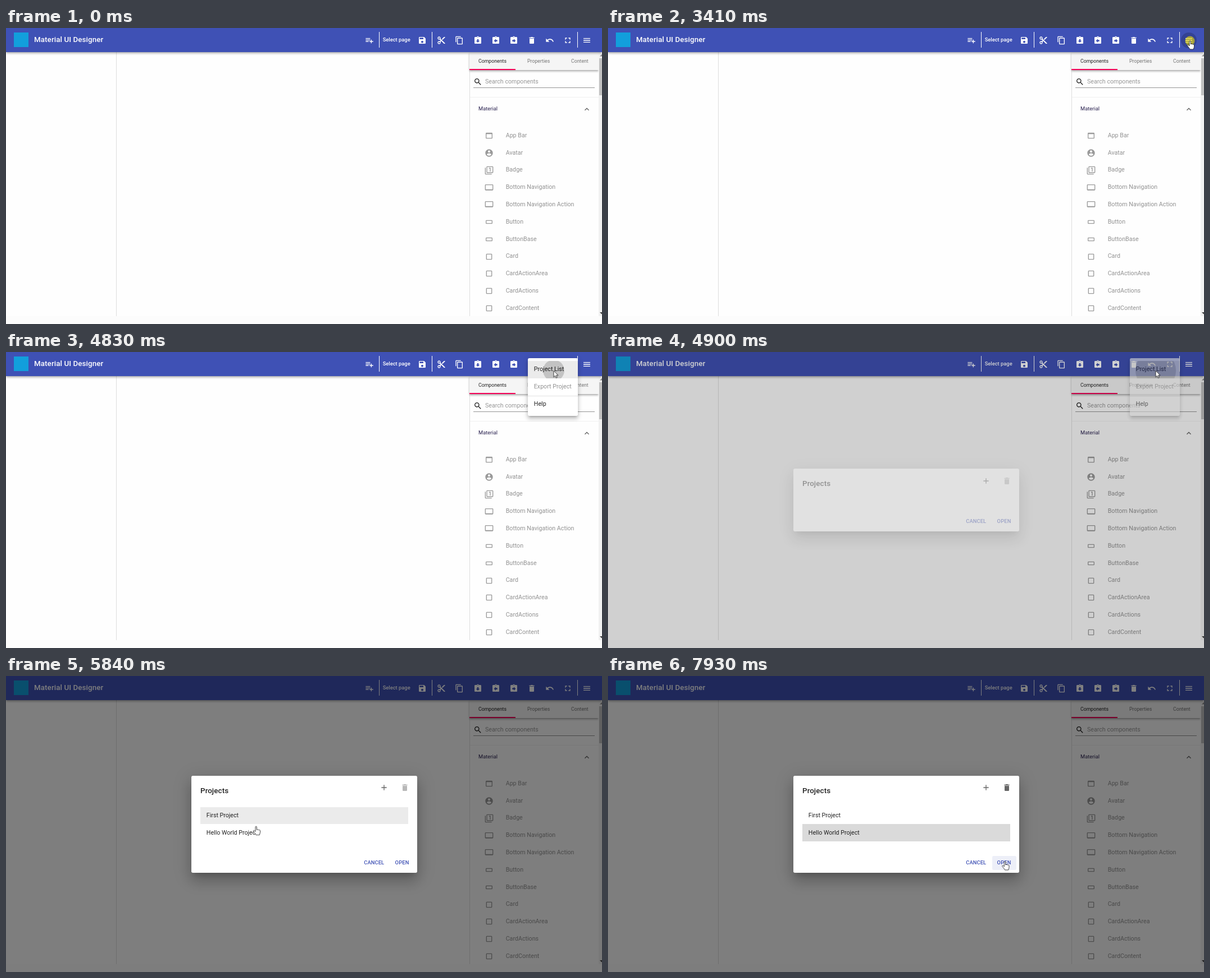
Recreate the animation shown at these times as an HTML page. Size 1061 by 528 pixels, loop 8 s.

```html
<!DOCTYPE html>
<html lang="en">
<head>
<meta charset="utf-8">
<title>Material UI Designer</title>
<style>
html, body { margin: 0; width: 100%; height: 100%; overflow: hidden; background: #fefefe; }
body { position: relative; font: 10.67px/16px Roboto, Arial, sans-serif; color: rgba(0,0,0,.87); }
div, span, svg { position: absolute; }
span { white-space: pre; }
svg { overflow: visible; }
.icon { width: 16px; height: 16px; fill: currentColor; fill-rule: evenodd; }
.fill { inset: 0; }
.title { font-size: 13.33px; font-weight: 500; letter-spacing: .1px; }
.small { font-size: 9.33px; }
.tab { font-size: 8.75px; }
.btn { font-size: 9.33px; font-weight: 500; letter-spacing: .12px; color: #3f51b5; }

#bar { left: 0; top: 0; width: 1061px; height: 43px; background: #3f51b5; color: #fff;
  box-shadow: 0 1.3px 2.7px -.7px rgba(0,0,0,.2), 0 2.7px 3.3px rgba(0,0,0,.14), 0 .7px 6.7px rgba(0,0,0,.12); }
#logo { left: 14px; top: 8px; width: 26px; height: 26px; background: #129fdc; }
.sep { top: 7px; width: 1px; height: 28px; background: #fff; }
#press { left: 1020px; top: 7.5px; width: 28px; height: 28px; border-radius: 50%; background: rgba(0,0,0,.18); }

.side { top: 43px; height: 471px; width: 1px; background: #dedede; }
#foot { left: 0; top: 514px; width: 1061px; height: 14px; background: #fcfcfc; }
#tabs { left: 825px; top: 43px; width: 230px; height: 32px; background: #f5f5f5;
  box-shadow: 0 1.3px 2.7px -.7px rgba(0,0,0,.2), 0 2.7px 3.3px rgba(0,0,0,.14), 0 .7px 4px rgba(0,0,0,.12); }
#ink { left: 825px; top: 73.4px; width: 82px; height: 1.6px; background: #f50057; }
#line { left: 832px; top: 106px; width: 216px; height: 1px; background: rgba(0,0,0,.42); }
#focus { left: 832px; top: 105.6px; width: 216px; height: 1.4px; background: rgba(0,0,0,.87); }
#rule { left: 826px; top: 122.5px; width: 229px; height: 1px; background: #f0f0f0; }
#track { left: 1055px; top: 43px; width: 6px; height: 471px; background: #f1f1f1; }
#thumb { left: 1056px; top: 54px; width: 5px; height: 66px; background: #c1c1c1; }

#menu { left: 929px; top: 11px; width: 89px; height: 103px; background: #fff; border-radius: 2.7px; transform-origin: 100% 0;
  box-shadow: 0 3.3px 3.3px -2px rgba(0,0,0,.2), 0 5.3px 6.7px .7px rgba(0,0,0,.14), 0 2px 9.3px 1.3px rgba(0,0,0,.12); }
#pick { left: 0; top: 5px; width: 89px; height: 31px; overflow: hidden; background: rgba(0,0,0,.08); }
#pick div { left: 26.5px; top: -2px; width: 38px; height: 38px; border-radius: 50%; background: rgba(0,0,0,.17); }
#menu hr { position: absolute; margin: 0; border: 0; left: 0; top: 66.5px; width: 89px; height: 1px; background: #e2e2e2; }

#shade { background: rgba(0,0,0,.5); }
#dialog { left: 330px; top: 177.5px; width: 401.5px; height: 173.5px; background: #fff; border-radius: 2.7px;
  box-shadow: 0 7.3px 10px -4.7px rgba(0,0,0,.2), 0 16px 25px 2px rgba(0,0,0,.14), 0 6px 30.7px 5.3px rgba(0,0,0,.12); }
.row { left: 16px; width: 369.5px; height: 30.8px; overflow: hidden; }
#wave { left: 73px; top: 5px; width: 24px; height: 24px; border-radius: 50%; background: rgba(0,0,0,.16); }
#open { left: 353.5px; bottom: 5.5px; width: 43px; height: 24.5px; border-radius: 2.7px; background: rgba(63,81,181,.09); }
#foot2 { left: 0; bottom: 10px; width: 100%; height: 16px; }

#cursor { left: 0; top: 0; width: 1px; height: 1px; }

/* one loop: 1% = 80 ms */
.a { animation: 8s linear infinite both; }
.s { animation-timing-function: step-end; }
#cursor { animation-name: move; }
#arrow { animation-name: arrow; }
#beam { animation-name: beam; }
#hand { animation-name: hand; }
#spot { animation-name: spot; }
#press { animation-name: press; }
#focus { animation-name: focus; }
#menu { animation-name: menu; }
#pick div { animation-name: pick; }
#shade { animation-name: fade; }
#dialog { animation-name: fade, grow; }
#list { animation-name: list; }
#one { animation-name: one; }
#two { animation-name: two; }
#wave { animation-name: wave; }
#open { animation-name: open; }
#bin { animation-name: bin; }

@keyframes move {
  0%, 6.5% { transform: translate(958px,540px); }
  6.6% { transform: translate(953px,517px); }
  8.4% { transform: translate(880px,450px); }
  10.2% { transform: translate(778px,372px); animation-timing-function: ease-out; }
  12.5%, 15.6% { transform: translate(695px,316px); }
  19% { transform: translate(736px,248px); }
  23.1%, 24.1% { transform: translate(820.5px,113.5px); animation-timing-function: ease-out; }
  26.25%, 26.6% { transform: translate(870px,86px); }
  30.5% { transform: translate(952px,66px); animation-timing-function: ease-out; }
  35%, 45.5% { transform: translate(1036px,23px); animation-timing-function: ease-in-out; }
  52.5% { transform: translate(971px,36px); }
  54.4%, 65.5% { transform: translate(975px,33.5px); animation-timing-function: ease-in; }
  69% { transform: translate(735px,140px); }
  73%, 73.8% { transform: translate(445px,268.5px); animation-timing-function: ease-out; }
  75.9% { transform: translate(432px,279px); }
  77.9%, 89% { transform: translate(431px,281px); animation-timing-function: ease-in; }
  94% { transform: translate(578px,306px); animation-timing-function: ease-out; }
  99.1%, 100% { transform: translate(706.5px,331px); }
}
@keyframes arrow {
  0%, 28.5%, 46.5%, 91.8% { opacity: 1; }
  25%, 34%, 72%, 97.8%, 100% { opacity: 0; }
}
@keyframes beam { 0%, 28.5%, 100% { opacity: 0; } 25% { opacity: 1; } }
@keyframes hand {
  0%, 46.5%, 91.8% { opacity: 0; }
  34%, 72%, 97.8%, 100% { opacity: 1; }
}
@keyframes spot {
  0%, 43.6%, 60.375%, 84.6%, 100% { opacity: 0; }
  42.6%, 58.375%, 83.6% { opacity: 1; }
}
@keyframes press {
  0%, 42.5% { opacity: 0; transform: scale(.9); }
  42.6%, 45% { opacity: 1; transform: none; }
  49.5%, 100% { opacity: 0; transform: none; }
}
@keyframes focus { 0%, 29%, 100% { opacity: 0; } 25% { opacity: 1; } }
@keyframes menu {
  0%, 44.5% { opacity: 0; transform: scale(.75,.56); animation-timing-function: cubic-bezier(.4,0,.2,1); }
  47.4% { opacity: 1; transform: none; animation-timing-function: step-end; }
  61.25% { opacity: .64; transform: none; animation-timing-function: step-end; }
  62.375% { opacity: .15; transform: scale(.9,.82); animation-timing-function: step-end; }
  63.25%, 100% { opacity: 0; transform: none; }
}
@keyframes pick {
  0%, 100% { opacity: 0; transform: none; }
  60.375% { opacity: 1; transform: none; }
  61.25% { opacity: 1; transform: scale(1.9); }
  62.375% { opacity: .6; transform: scale(3); }
  63.25% { opacity: 0; }
}
@keyframes fade {
  0% { opacity: 0; }
  61.25% { opacity: .36; }
  62.375% { opacity: .83; }
  63.25% { opacity: .98; }
  64.25%, 100% { opacity: 1; }
}
@keyframes grow {
  0% { top: 208.3px; height: 112px; }
  62.375%, 100% { top: 177.5px; height: 173.5px; }
}
@keyframes list { 0% { opacity: 0; } 62.375%, 100% { opacity: 1; } }
@keyframes one {
  0%, 73.9%, 100% { background: transparent; }
  71% { background: rgba(0,0,0,.08); }
}
@keyframes two {
  0% { background: transparent; }
  73.9% { background: rgba(0,0,0,.08); }
  84.6%, 100% { background: rgba(0,0,0,.145); }
}
@keyframes wave {
  0%, 83.6% { opacity: 0; transform: scale(.2); }
  83.7% { opacity: 1; transform: scale(.5); }
  86% { opacity: .8; transform: scale(14); }
  87.6%, 100% { opacity: 0; transform: scale(25); }
}
@keyframes open { 0%, 97.8% { opacity: 0; } 99.1%, 100% { opacity: 1; } }
@keyframes bin { 0% { color: rgba(0,0,0,.28); } 84.6%, 100% { color: rgba(0,0,0,.6); } }
</style>
</head>
<body>
<div id="foot"></div>
<div class="side" style="left:196px"></div>
<div class="side" style="left:824.5px"></div>
<div id="panel" class="fill">
  <div id="tabs"></div>
  <div id="ink"></div>
  <div id="line"></div>
  <div id="focus" class="a s"></div>
  <div id="rule"></div>
  <div id="track"></div>
  <div id="thumb"></div>
  <svg width="1061" height="528">
    <path d="M1057 50.5l3.5-3.5 3.5 3.5z" fill="#8a8a8a"/>
    <path d="M1057 507l3.5 3.5 3.5-3.5z" fill="#404040"/>
  </svg>
</div>
<div id="bar">
  <div id="logo"></div>
  <div class="sep" style="left:664px"></div>
  <div class="sep" style="left:758px"></div>
  <div class="sep" style="left:1017px"></div>
  <div id="press" class="a"></div>
</div>
<div id="menu" class="a">
  <div id="pick"><div class="a s"></div></div>
  <hr>
</div>
<div id="shade" class="fill a s"></div>
<div id="dialog" class="a s">
  <div id="list" class="fill a s">
    <div id="one" class="row a s" style="top:56px"></div>
    <div id="two" class="row a s" style="top:86.8px"><div id="wave" class="a"></div></div>
  </div>
  <div id="bin" class="a s"></div>
  <div id="open" class="a"></div>
  <div id="foot2"></div>
</div>
<svg id="cursor" class="a">
  <circle id="spot" class="a s" r="8.5" fill="#f0e000" fill-opacity=".6"/>
  <path id="arrow" class="a s" d="M0 0v11.3l2.6-2.5 1.7 4 1.9-.8-1.7-3.9h3.6z" fill="#fff" stroke="#111" stroke-width=".8"/>
  <path id="beam" class="a s" d="M-2.5-7h2L0-6.5.5-7h2M0-6.5v13M-2.5 7h2L0 6.5.5 7h2" fill="none" stroke="#111" stroke-width=".9"/>
  <path id="hand" class="a s" d="M-1 1a1.2 1.2 0 0 1 2.4 0v5l.3-.1c.3-.9 2-.8 2.2.2.5-.7 1.9-.5 2 .4.6-.5 1.6-.1 1.6.8v3.2c0 2-1.2 2.7-1.2 4.5h-6.3c-.3-1.5-3.6-4.8-4.6-6.6-.6-1.2.8-1.9 1.7-1.1l1.9 1.7z" fill="#fff" stroke="#111" stroke-width=".8"/>
</svg>
<script>
const clip = 'M19 3h-4.18C14.4 1.84 13.3 1 12 1c-1.3 0-2.4.84-2.82 2H5c-1.1 0-2 .9-2 2v14c0 1.1.9 2 2 2h14c1.1 0 2-.9 2-2V5c0-1.1-.9-2-2-2zm-7 0c.55 0 1 .45 1 1s-.45 1-1 1-1-.45-1-1 .45-1 1-1z';
const icons = {
  add: 'M19 13h-6v6h-2v-6H5v-2h6V5h2v6h6v2z',
  addList: 'M14 10H2v2h12v-2zm0-4H2v2h12V6zm4 8v-4h-2v4h-4v2h4v4h2v-4h4v-2h-4zM2 16h8v-2H2v2z',
  save: 'M17 3H5c-1.11 0-2 .9-2 2v14c0 1.1.89 2 2 2h14c1.1 0 2-.9 2-2V7l-4-4zm-5 16c-1.66 0-3-1.34-3-3s1.34-3 3-3 3 1.34 3 3-1.34 3-3 3zm3-10H5V5h10v4z',
  cut: 'M9.64 7.64c.23-.5.36-1.05.36-1.64 0-2.21-1.79-4-4-4S2 3.79 2 6s1.79 4 4 4c.59 0 1.14-.13 1.64-.36L10 12l-2.36 2.36C7.14 14.13 6.59 14 6 14c-2.21 0-4 1.79-4 4s1.79 4 4 4 4-1.79 4-4c0-.59-.13-1.14-.36-1.64L12 14l7 7h3v-1L9.64 7.64zM6 8c-1.1 0-2-.89-2-2s.9-2 2-2 2 .89 2 2-.9 2-2 2zm0 12c-1.1 0-2-.89-2-2s.9-2 2-2 2 .89 2 2-.9 2-2 2zM19 3l-6 6 2 2 7-7V3z',
  copy: 'M16 1H4c-1.1 0-2 .9-2 2v14h2V3h12V1zm3 4H8c-1.1 0-2 .9-2 2v14c0 1.1.9 2 2 2h11c1.1 0 2-.9 2-2V7c0-1.1-.9-2-2-2zm0 16H8V7h11v14z',
  down: clip + 'M12 18l-5-5h3V9h4v4h3z',
  left: clip + 'M16 15h-4v3l-5-5 5-5v3h4z',
  right: clip + 'M8 15h4v3l5-5-5-5v3H8z',
  bin: 'M6 19c0 1.1.9 2 2 2h8c1.1 0 2-.9 2-2V7H6v12zM19 4h-3.5l-1-1h-5l-1 1H5v2h14V4z',
  undo: 'M12.5 8c-2.65 0-5.05.99-6.9 2.6L2 7v9h9l-3.62-3.62c1.39-1.16 3.16-1.88 5.12-1.88 3.54 0 6.55 2.31 7.6 5.5l2.37-.78C21.08 11.03 17.15 8 12.5 8z',
  full: 'M7 14H5v5h5v-2H7v-3zm-2-4h2V7h3V5H5v5zm12 7h-3v2h5v-5h-2v3zM14 5v2h3v3h2V5h-5z',
  menu: 'M3 18h18v-2H3v2zm0-5h18v-2H3v2zm0-7v2h18V6H3z',
  search: 'M15.5 14h-.79l-.28-.27C15.41 12.59 16 11.11 16 9.5 16 5.91 13.09 3 9.5 3S3 5.91 3 9.5 5.91 16 9.5 16c1.61 0 3.09-.59 4.23-1.57l.27.28v.79l5 4.99L20.49 19l-4.99-5zm-6 0C7.01 14 5 11.99 5 9.5S7.01 5 9.5 5 14 7.01 14 9.5 11.99 14 9.5 14z',
  less: 'M12 8l-6 6 1.41 1.41L12 10.83l4.59 4.58L18 14z',
  web: 'M19 4H5c-1.11 0-2 .9-2 2v12c0 1.1.89 2 2 2h14c1.1 0 2-.9 2-2V6c0-1.1-.9-2-2-2zm0 14H5V8h14v10z',
  user: 'M12 2C6.48 2 2 6.48 2 12s4.48 10 10 10 10-4.48 10-10S17.52 2 12 2zm0 3c1.66 0 3 1.34 3 3s-1.34 3-3 3-3-1.34-3-3 1.34-3 3-3zm0 14.2c-2.5 0-4.71-1.28-6-3.22.03-1.99 4-3.08 6-3.08 1.99 0 5.97 1.09 6 3.08-1.29 1.94-3.5 3.22-6 3.22z',
  badge: 'M3 5H1v16c0 1.1.9 2 2 2h16v-2H3V5zm11 10h2V5h-4v2h2v8zm7-14H7c-1.1 0-2 .9-2 2v14c0 1.1.9 2 2 2h14c1.1 0 2-.9 2-2V3c0-1.1-.9-2-2-2zm0 16H7V3h14v14z',
  nav: 'M21 3H3c-1.11 0-2 .89-2 2v12c0 1.1.89 2 2 2h18c1.1 0 2-.9 2-2V5c0-1.11-.9-2-2-2zm0 13H3V5h18v11z',
  button: 'M19 7H5c-1.1 0-2 .9-2 2v6c0 1.1.9 2 2 2h14c1.1 0 2-.9 2-2V9c0-1.1-.9-2-2-2zm0 8H5V9h14v6z',
  card: 'M18 4H6c-1.1 0-2 .9-2 2v12c0 1.1.9 2 2 2h12c1.1 0 2-.9 2-2V6c0-1.1-.9-2-2-2zm0 14H6V6h12v12z'
};

const put = (id, html) => document.getElementById(id).insertAdjacentHTML('beforeend', html);
// icons are placed by their centre, text by its left edge and middle line
const icon = (id, name, x, y, color = '') => put(id,
  `<svg class="icon" viewBox="0 0 24 24" style="left:${x - 8}px;top:${y - 8}px;color:${color}"><path d="${icons[name]}"/></svg>`);
const text = (id, str, x, y, cls = '', style = '') => put(id,
  `<span class="${cls}" style="left:${x}px;top:${y - 8}px;${style}">${str}</span>`);

text('bar', 'Material UI Designer', 50, 21.3, 'title');
text('bar', 'Select page', 670.7, 21, 'small', 'font-weight:500');
Object.entries({ addList: 647, save: 741, cut: 775, copy: 807, down: 839.5, left: 871.5,
  right: 903.5, bin: 935.7, undo: 967.7, full: 1000, menu: 1034 })
  .forEach(([name, x]) => icon('bar', name, x, 21.5));

text('panel', 'Components', 841, 59.2, 'tab');
text('panel', 'Properties', 928, 59.2, 'tab', 'color:#757575');
text('panel', 'Content', 1006, 59.2, 'tab', 'color:#757575');
icon('panel', 'search', 840, 96.3, '#222');
text('panel', 'Search components', 853, 96.2, '', 'color:#979797');
text('panel', 'Material', 841, 144, 'small', 'color:#2a2250');
icon('panel', 'less', 1033.5, 144.5, '#666');
[['web', 'App Bar'], ['user', 'Avatar'], ['badge', 'Badge'], ['nav', 'Bottom Navigation'],
 ['nav', 'Bottom Navigation Action'], ['button', 'Button'], ['button', 'ButtonBase'], ['card', 'Card'],
 ['card', 'CardActionArea'], ['card', 'CardActions'], ['card', 'CardContent']]
  .forEach(([name, label], i) => {
    const y = 191.9 + 30.77 * i;
    icon('panel', name, 860, y + .3, '#9a9a9a');
    text('panel', label, 889.7, y, '', 'color:#929292');
  });

text('menu', 'Project List', 10.8, 20);
text('menu', 'Export Project', 10.8, 51, '', 'color:#929292');
text('menu', 'Help', 10.8, 82.3);

text('dialog', 'Projects', 16, 26.7, 'title');
icon('dialog', 'add', 342.5, 21.3, '#666');
icon('bin', 'bin', 380, 21.3);
text('list', 'First Project', 26.8, 71.2);
text('list', 'Hello World Project', 26.8, 102);
text('foot2', 'CANCEL', 307.2, 8, 'btn');
text('foot2', 'OPEN', 362.6, 8, 'btn');
</script>
</body>
</html>
```
